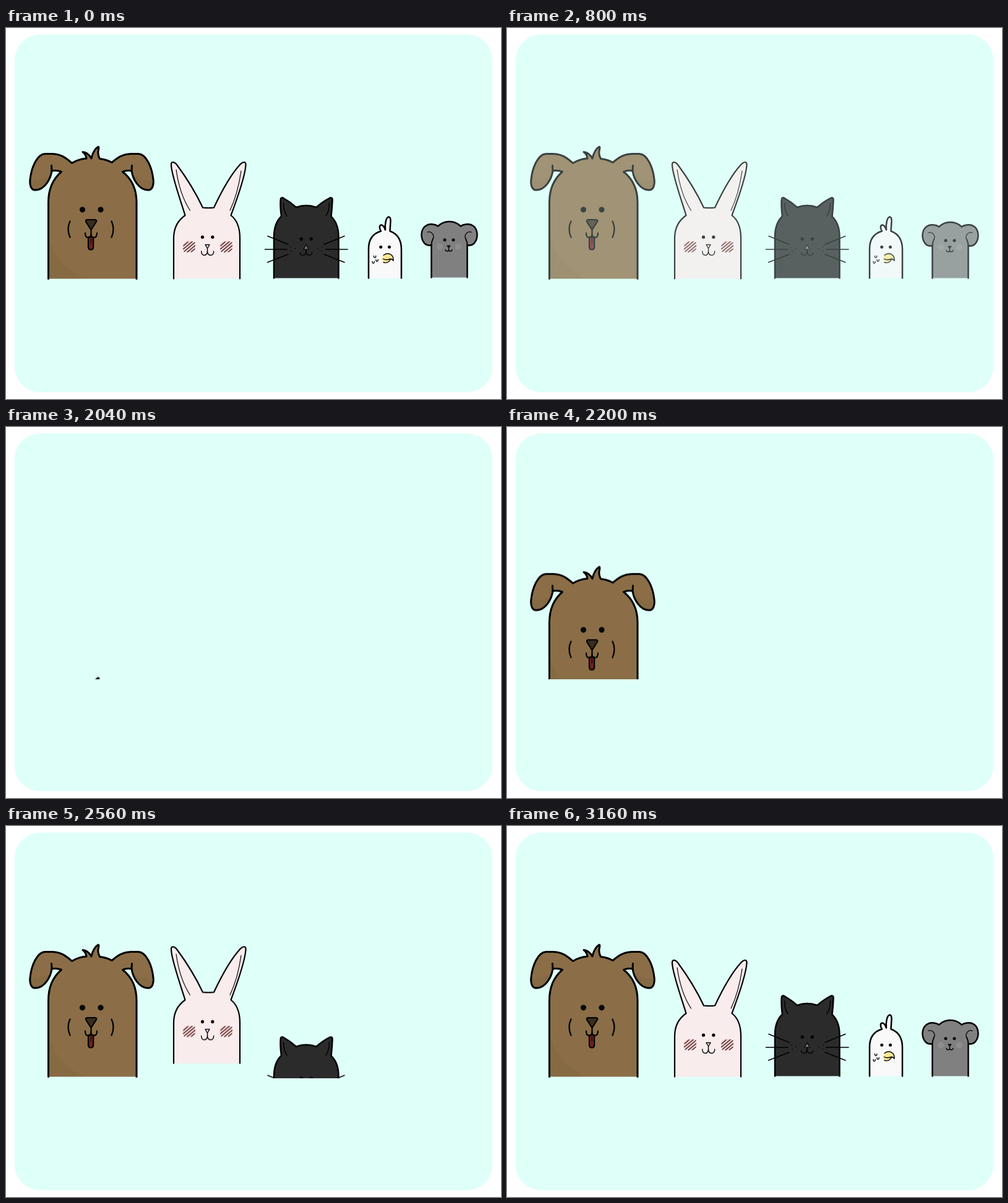
An HTML page without scripts for the animation above (4000 ms loop, 800 by 600 pixels).

```html
<!DOCTYPE html>
<html lang="en">
<head>
<meta charset="utf-8">
<title>Animal parade</title>
<style>
  html, body { margin: 0; width: 100%; height: 100%; overflow: hidden; background: #fff; }
  svg { display: block; }
  .cast { animation: fade 4s linear infinite; }
  .cast g { stroke: #000; stroke-linecap: round; stroke-linejoin: round; }
  .line { fill: none; }
  .dot { fill: #050505; stroke: none; }
  .soft { stroke: none; }

  .pop { animation: pop 4s linear infinite; }
  .dog    { --drop: 217px; --over: -20px; animation-delay: -1968ms; }
  .rabbit { --drop: 194px; --over: -23px; animation-delay: -1758ms; }
  .cat    { --drop: 136px; --over: -13px; animation-delay: -1549ms; }
  .bird   { --drop: 105px; --over: -9px;  animation-delay: -1372ms; }
  .koala  { animation: koala 4s linear infinite; }

  @keyframes fade {
    0%, 19% { opacity: 1; }
    23%, 50% { opacity: 0; }
    50.01%, 100% { opacity: 1; }
  }
  @keyframes pop {
    0% { transform: translateY(var(--drop)); animation-timing-function: cubic-bezier(.33, .12, .5, 1); }
    7.1% { transform: translateY(var(--over)); animation-timing-function: cubic-bezier(.4, 0, .5, 1); }
    12.7%, 75% { transform: translateY(0); }
    75.01%, 100% { transform: translateY(var(--drop)); }
  }
  @keyframes koala {
    0% { transform: translateY(-1px); animation-timing-function: ease-out; }
    3%, 40% { transform: translateY(0); }
    40.01% { transform: translateY(97px); }
    71.2% { transform: translateY(97px); animation-timing-function: cubic-bezier(.33, .12, .5, 1); }
    77.5% { transform: translateY(-5px); }
    78.99% { transform: translateY(-4px); }
    79%, 100% { transform: translateY(0); }
  }
</style>
</head>
<body>
<svg width="100%" height="100%" viewBox="0 0 800 600">
  <defs>
    <g id="blush">
      <ellipse class="soft" cx="296" cy="353.5" rx="10.5" ry="9.5" fill="#f8cfcf"/>
      <path class="line" stroke="#352020" stroke-width="1.4" d="M287 352L294 346M286.5 357.5L301 345.5M288 361.5L305 347M293 362.5L305.5 352M299.5 362L305 357.5"/>
    </g>
    <path id="feather" class="line" d="M0 0v1.5q1.6 3 3.2 0V0"/>
  </defs>

  <rect x="14" y="10.5" width="772" height="578.5" rx="41" fill="#dffff9"/>

  <svg width="800" height="408">
    <g class="cast">

      <g class="pop dog" fill="#8b6e47" stroke-width="3">
        <path d="M68.5 405.5V282C68.5 259 76 244 89.500 232.500Q82 229.500 74 231C72 245 62 261.500 48 262C40 263 38 253 39 245C41 226 50 204 63 203.500H75C90 204 98 211 106.500 218.500Q117 212 130 211Q129 204 124 200.500Q133 201.500 138 211Q141 197 149 192Q150.500 192 149.500 197Q147.500 204 151.500 211.500Q162 212.500 171 217.500C179 211 187 204 202 203.500H214C227 204 236 226 238 245C239 253 237 263 229 262C215 261.500 205 245 203 231Q195 229.500 188.500 232.500C203 244 211 259 211 282V405.500"/>
        <path class="soft" fill="#000" opacity=".04" d="M70 340Q82 385 126 405.500H70zM40 247Q57 247 70 240Q62 261 48 261Q39 262 40 247zM237 247Q220 247 207 240Q215 261 229 261Q238 262 237 247z"/>
        <path class="line" d="M73.500 222.500L74 231M203.500 222.500L203 231"/>
        <path class="line" stroke-width="2.300" d="M103.500 312.500Q97.500 325 103.500 338.500M170.500 312.500Q176.500 325 170.500 338.500"/>
        <circle class="dot" cx="123.500" cy="293.800" r="4.600"/>
        <circle class="dot" cx="153" cy="293.800" r="4.600"/>
        <path fill="#6e2020" stroke-width="2.200" d="M133 338V354Q133 358.500 137 358.500Q141.200 358.500 141.200 354V338z"/>
        <path class="line" stroke-width="1" d="M137.300 340V348"/>
        <path class="line" stroke-width="2.200" d="M137.500 326V332M128 331.500Q128 339 132.500 339Q137.500 339 137.500 332Q137.500 339 142 339Q147 339 147 331.500"/>
        <path fill="#3a2d1b" stroke-width="2.200" d="M130.500 310H144.500Q147.500 311 145.500 314L138.500 325Q137.500 326.500 136.500 325L129.500 314Q128 311 130.500 310z"/>
      </g>

      <g class="pop rabbit" fill="#f9ecec" stroke-width="2.200">
        <path d="M271 405.500V340C271 322 278 311 289.500 303C281 275 268 240 267 222C266.500 216 271 215.500 276 221C290 240 306 265 318 290.500Q327 291.500 336 290.500C348 265 364 236 379 220C384 215.500 388 216 387.500 222C386 242 374 275 363.500 303C374 311 378 324 378 340V405.500"/>
        <path class="line" stroke-width="1.200" d="M275 229C278 250 285 276 297.500 295M380 231C377 252 371 276 362 295"/>
        <circle class="dot" cx="317.500" cy="338.200" r="2.600"/>
        <circle class="dot" cx="333.800" cy="338.200" r="2.600"/>
        <path class="line" stroke-width="1.400" d="M322 350.500H329L325.500 356.500zM325.500 356.500V360M315.700 361Q315.700 367.500 320.500 367.500Q325.500 367.500 325.500 360Q325.500 367.500 330.500 367.500Q335.700 367.500 335.700 361"/>
        <use href="#blush"/>
        <use href="#blush" x="60"/>
      </g>

      <g class="pop cat" fill="#2b2b2b" stroke-width="2.500">
        <path d="M433 404.500V338C433 322 437 312 445 304.500C443.500 293 443 283 444 276Q445 273 449 275.500Q459 281 469 290Q485 284 501.500 290C508 284 517 278 524 274.500Q528 274 527.500 279Q527 292 525.500 305C533 312 537.500 324 537.500 338V404.500"/>
        <path class="line" stroke-width="1.500" d="M448.500 283Q448.500 296 454 304M522.500 283Q522.500 296 517 304M423 336.500L456 350M418.500 358H454M422.500 379L456 366M547 336.500L514 350M552 358H516M547 379L514 366"/>
        <circle class="dot" cx="477.300" cy="341.300" r="2.700"/>
        <circle class="dot" cx="493.300" cy="341.300" r="2.700"/>
        <path class="line" stroke-width="1.700" d="M460 354h0M467 357h0M461 361h0M511 354h0M504 357h0M510 361h0"/>
        <path fill="#777" stroke-width="1.200" d="M485 350.500L489 358H481z"/>
        <path class="line" stroke-width="1.500" d="M485 358V361M475.500 363.500Q476 367.500 480 367.500Q485 367.500 485 361Q485 367.500 490 367.500Q494 367.500 494.500 363.500"/>
      </g>

      <g class="pop bird" fill="#f9f9f9" stroke-width="2.500">
        <path d="M586 404.500V357C586 341 594 332 606 328.500C602.500 323 603.500 319 606.500 318.500Q610.500 319 613 326.500C612 316 614.500 306 618.500 305.500Q622 306 621.500 313L620.500 328.500C633 333 639 342 639 358V404.500"/>
        <circle class="dot" cx="605.700" cy="354.200" r="2.500"/>
        <circle class="dot" cx="619.500" cy="354.200" r="2.500"/>
        <path class="soft" fill="#f8e694" d="M608 372Q610 364.500 617 364.500Q625 365 626 376Q623 373 620.500 376.500Q616 381.500 611 379.500Q607.500 377 608 372z"/>
        <path class="line" stroke-width="1.400" d="M610 367.500Q617 362 623.500 367.500Q626.500 371 626 376.500Q624 373 621 373.500Q614 376 609.500 373.500M621.500 374Q617.500 381.500 610 379"/>
        <g stroke-width="1.300">
          <use href="#feather" x="594.500" y="368.500"/>
          <use href="#feather" x="598" y="374.500"/>
          <use href="#feather" x="592" y="377.500"/>
        </g>
      </g>

      <g class="koala" fill="#808080" stroke-width="2.500">
        <path d="M687.500 404.500V352C678 354.500 671.500 346 671.500 335C672 322 682 317 690 318.500Q695 319 698 321.500Q706 314 716.500 314Q727 314 735 321.500Q738 319 743 318.500C752 317 761 322 761.500 335C761.500 346 755 354.500 745.500 352V404.500"/>
        <path class="line" stroke-width="1.800" d="M690 342Q687.500 347 687.500 352M743 342Q745.500 347 745.500 352"/>
        <path class="line" stroke-width="1.300" d="M681 331Q688 329 691 337Q691.500 340 690 342M752 331Q745 329 742 337Q741.500 340 743 342"/>
        <circle class="soft" cx="701" cy="354.500" r="5" fill="#8d8d8d"/>
        <circle class="soft" cx="731" cy="354.500" r="5" fill="#8d8d8d"/>
        <circle class="dot" cx="709" cy="343.700" r="2.500"/>
        <circle class="dot" cx="723" cy="343.700" r="2.500"/>
        <path fill="#333" stroke-width="1.200" d="M713 353H718L715.500 356z"/>
        <path class="line" stroke-width="1.300" d="M715.500 356V359M710 359.500Q710.500 362 713 362Q715.500 362 715.500 359Q715.500 362 718 362Q720.500 362 721 359.500"/>
      </g>

    </g>
  </svg>
</svg>
</body>
</html>
```
